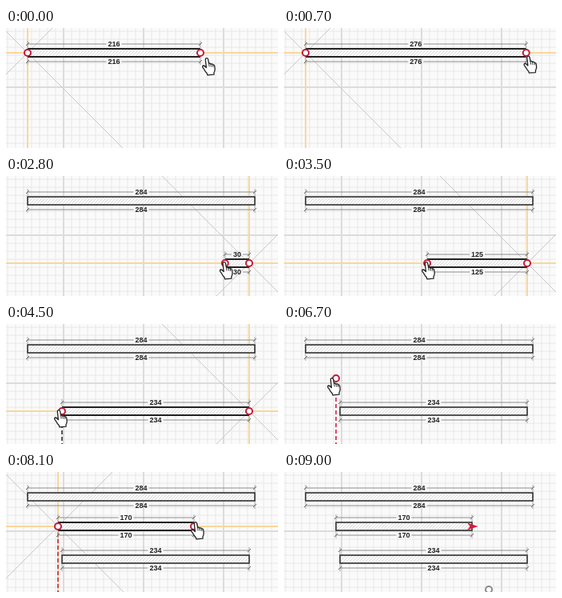
An HTML page with a canvas that plays this animation: 340x150 px, repeating every 9300 ms.

```html
<!DOCTYPE html>
<html lang="en">
<head>
<meta charset="utf-8">
<title>Drawing walls</title>
<style>
html, body { margin: 0; width: 100%; height: 100%; overflow: hidden; background: #fafafa; }
canvas { display: block; }
</style>
</head>
<body>
<canvas id="stage" width="340" height="150"></canvas>
<script>
const W = 340, H = 150, LOOP = 9300, STEP = 100;
const ctx = document.getElementById('stage').getContext('2d');
const RED = '#c41a38', INK = '#222';

// time, hand x, hand y, handle x, handle y, ease-out power
const PATH = [
  [0, 245, 37, 243, 31, 1],
  [1000, 307, 34, 311, 31, 1.75],
  [1800, 307, 34, 311, 31, 1],
  [2400, 297, 107, 304, 109, 1.3],
  [2600, 297, 107, 304, 109, 1],
  [3500, 172, 107, 179, 109, 1.1],
  [3600, 164, 107, 171, 109, 1],
  [4500, 60, 107, 70, 109, 1.2],
  [5700, 60, 107, 70, 109, 1],
  [6300, 54, 67, 65, 68, 1.3],
  [6800, 54, 67, 65, 68, 1],
  [8100, 231, 62, 235, 68, 1.75],
  [8500, 231, 62, 235, 68, 1],
  [9000, 258, 153, 256, 147, 1]
];

// press: handle turns red, start: guides appear, end: wall is placed
const WALLS = [
  { x: 27, y: 31, to: 311, press: 0, start: 0, end: 1800, next: 2700 },
  { x: 304, y: 109, to: 70, press: 2700, start: 2700, end: 5400, next: 6700 },
  { x: 65, y: 68, to: 235, press: 6700, start: 6900, end: 8500, next: LOOP }
];

const HAND = new Path2D('M4.3 2.6Q4.3 .7 5.8 .7Q7.3 .7 7.7 2.4L8.6 7.4Q10.2 6.4 11 8.2' +
  'Q12.8 7.2 13.5 9Q15.4 8.7 15.8 10.8L16.2 14.5Q16.1 17 15 18.6L15 21.2L6.8 21.8' +
  'L6.3 19.8Q4.2 17.8 3 15.2L.8 12.2Q.2 10.2 2 10Q3.4 10.2 5.4 12.6Z');
const FINGERS = new Path2D('M8.6 7.4L9.2 11.4M11 8.2L11.6 11.6M13.5 9L13.9 12');

function pointerAt(t) {
  let i = 1;
  while (i < PATH.length - 1 && PATH[i][0] < t) i++;
  const a = PATH[i - 1], b = PATH[i];
  const u = Math.min(1, (t - a[0]) / (b[0] - a[0]));
  const k = 1 - Math.pow(1 - u, b[5]);
  const [hx, hy, x, y] = [1, 2, 3, 4].map(n => a[n] + (b[n] - a[n]) * k);
  return { hx, hy, x, y };
}

function line(x1, y1, x2, y2, color, width = 1) {
  ctx.strokeStyle = color;
  ctx.lineWidth = width;
  ctx.beginPath();
  ctx.moveTo(x1, y1);
  ctx.lineTo(x2, y2);
  ctx.stroke();
}

function mesh(gap, x0, y0, color, width) {
  for (let x = x0; x < W; x += gap) line(x, 0, x, H, color, width);
  for (let y = y0; y < H; y += gap) line(0, y, W, y, color, width);
}

function grid() {
  ctx.fillStyle = '#fafafa';
  ctx.fillRect(0, 0, W, H);
  mesh(10, 2, 4, '#e8e8e8', 1);
  mesh(100, 72, 74, '#dcdcdc', 2);
}

function guides(x, y) {
  line(x - W, y - W, x + W, y + W, '#c8c8c8');
  line(x - W, y + W, x + W, y - W, '#c8c8c8');
  line(0, y, W, y, '#fad79a', 2);
  line(x, 0, x, H, '#fad79a', 2);
}

function snapLine(x, y, color) {
  ctx.setLineDash([5, 3]);
  line(x, y, x, H, color, 1.5);
  ctx.setLineDash([]);
}

function dimension(x1, x2, y, side) {
  const dy = y + side * 11, mid = (x1 + x2) / 2, gray = '#8c8c8c';
  const text = String(Math.round(x2 - x1));
  const gap = ctx.measureText(text).width / 2 + 2;
  if (x2 - x1 > gap * 2) {
    line(x1, dy, mid - gap, dy, gray);
    line(mid + gap, dy, x2, dy, gray);
  }
  for (const x of [x1, x2]) {
    line(x, y + side * 6, x, y + side * 15, '#aaa');
    line(x - 2, dy + 2, x + 2, dy - 2, '#666');
  }
  ctx.fillStyle = INK;
  ctx.fillText(text, mid, dy + 3);
}

function wall(a, b, y, drawing) {
  const x1 = Math.min(a, b), x2 = Math.max(a, b);
  if (x2 - x1 < 1) return;
  ctx.save();
  ctx.beginPath();
  ctx.rect(x1, y - 5, x2 - x1, 10);
  ctx.clip();
  ctx.fillStyle = '#fff';
  ctx.fillRect(x1, y - 5, x2 - x1, 10);
  for (let x = x1 - 10; x < x2; x += 4) line(x, y + 5, x + 10, y - 5, '#cacaca', 0.8);
  ctx.restore();
  if (drawing) {
    line(x1, y - 5, x2, y - 5, INK, 2);
    line(x1, y + 5, x2, y + 5, INK, 2);
  } else {
    ctx.strokeStyle = INK;
    ctx.lineWidth = 1.5;
    ctx.strokeRect(x1, y - 5, x2 - x1, 10);
  }
  dimension(x1, x2, y, -1);
  dimension(x1, x2, y, 1);
}

function ring(x, y, color, r = 4, width = 2) {
  ctx.beginPath();
  ctx.arc(x, y, r, 0, Math.PI * 2);
  ctx.fillStyle = '#fff';
  ctx.fill();
  ctx.strokeStyle = color;
  ctx.lineWidth = width;
  ctx.stroke();
}

function arrow(x, y, dir) {
  ctx.fillStyle = '#d51a3c';
  ctx.beginPath();
  ctx.moveTo(x - 6 * dir, y - 4.5);
  ctx.lineTo(x + 7.5 * dir, y);
  ctx.lineTo(x - 6 * dir, y + 4.5);
  ctx.lineTo(x - 2.5 * dir, y);
  ctx.fill();
}

function hand(x, y) {
  ctx.save();
  ctx.translate(x, y);
  ctx.fillStyle = '#fff';
  ctx.fill(HAND);
  ctx.strokeStyle = INK;
  ctx.lineWidth = 1.3;
  ctx.lineJoin = 'round';
  ctx.stroke(HAND);
  ctx.lineWidth = 0.9;
  ctx.stroke(FINGERS);
  ctx.restore();
}

function draw(t) {
  const p = pointerAt(t);
  const active = WALLS.find(w => t >= w.start && t < w.end);
  const pressed = WALLS.some(w => t >= w.press && t < w.end);
  const placed = WALLS.find(w => t >= w.end && t < w.next);
  const released = placed && t < placed.end + STEP;

  grid();
  if (active) guides(active.x, active.y);
  if (t >= 4500 && t < 5400) snapLine(70, 109, INK);
  if (t >= 6300 && t < 8500) snapLine(65, 68, RED);

  ctx.font = 'bold 9px "Liberation Sans", Arial, sans-serif';
  ctx.textAlign = 'center';
  for (const w of WALLS) {
    if (t >= w.start) wall(w.x, w === active ? p.x : w.to, w.y, w === active);
  }

  if (active) ring(active.x, active.y, RED);
  if (released) ring(placed.x, placed.y, RED, 2.7, 1.5);
  if (placed) arrow(placed.to, placed.y, Math.sign(placed.to - placed.x));
  ring(p.x, p.y, pressed || released ? RED : '#8a8a8a');
  hand(p.hx, p.hy);
}

const began = performance.now();
function tick() {
  const t = (performance.now() - began) % LOOP;
  draw(Math.floor(t / STEP) * STEP);
  requestAnimationFrame(tick);
}
tick();
</script>
</body>
</html>
```
